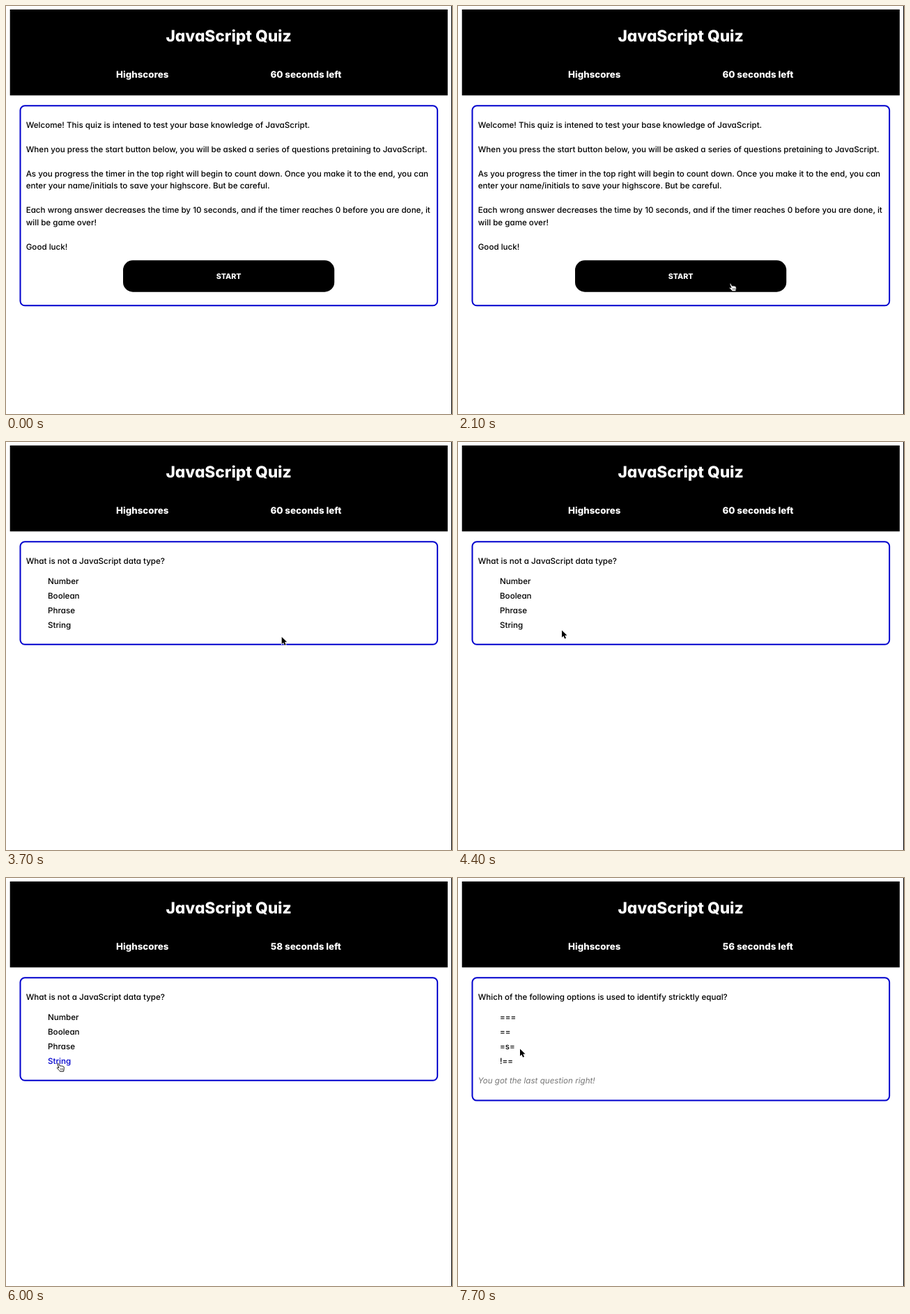
These frames come from a looping animation (640 by 586 pixels, 8000 ms). An HTML page:

```html
<!DOCTYPE html>
<html lang="en">
<head>
<meta charset="utf-8">
<title>JavaScript Quiz</title>
<style>
  html, body { margin: 0; width: 100%; height: 100%; overflow: hidden; background: #fff; }
  svg { display: block; width: 100%; height: 100%; }
  text {
    font: 450 11.62px Inter, "Open Sans", sans-serif;
    font-feature-settings: "cv11", "calt" 0;
    text-rendering: geometricPrecision;
    white-space: pre;
  }
  .bold { font-weight: 800; fill: #fff; text-anchor: middle; }
  .title { font-size: 22.7px; }
  .bar { font-size: 13.3px; }
  .start { font-size: 10.7px; }
  .result { font-style: italic; fill: #777; }
  .hover { fill: #0000cd; }
  .box { fill: none; stroke: #0000cd; stroke-width: 2; }
</style>
</head>
<body>
<svg viewBox="0 0 640 586">
  <rect x="639" width="1" height="586"/>
  <rect x="5.7" y="5" width="628.1" height="123.4"/>
  <text class="bold title" x="319.6" y="51">JavaScript Quiz</text>
  <text class="bold bar" x="195.7" y="103.2">Highscores</text>
  <text class="bold bar" id="timer" x="430.4" y="103.2">60 seconds left</text>
  <rect class="box" id="box" x="20.5" y="143.3" width="598.6" height="287" rx="6.5"/>

  <g id="welcome">
    <text x="28.7" y="175">Welcome! This quiz is intened to test your base knowledge of JavaScript.</text>
    <text x="28.7" y="210">When you press the start button below, you will be asked a series of questions pretaining to JavaScript.</text>
    <text x="28.7" y="245">As you progress the timer in the top right will begin to count down. Once you make it to the end, you can</text>
    <text x="28.7" y="262.4">enter your name/initials to save your highscore. But be careful.</text>
    <text x="28.7" y="297.3">Each wrong answer decreases the time by 10 seconds, and if the timer reaches 0 before you are done, it</text>
    <text x="28.7" y="314.7">will be game over!</text>
    <text x="28.7" y="349.5">Good luck!</text>
    <rect x="168" y="365.3" width="303.2" height="45.4" rx="14"/>
    <text class="bold start" x="319.7" y="391.9">START</text>
  </g>

  <g id="types">
    <text x="28.7" y="175">What is not a JavaScript data type?</text>
    <text x="60" y="204">Number</text>
    <text x="60" y="225">Boolean</text>
    <text x="60" y="246" id="phrase">Phrase</text>
    <text x="60" y="267" id="string">String</text>
  </g>

  <g id="equality">
    <text x="28.7" y="175">Which of the following options is used to identify stricktly equal?</text>
    <text x="60" y="204">===</text>
    <text x="60" y="225">==</text>
    <text x="60" y="246" id="mixed">=s=</text>
    <text x="60" y="267">!==</text>
    <text x="28.7" y="295" class="result">You got the last question right!</text>
  </g>

  <g id="cursor">
    <path id="arrow" stroke="#fff" stroke-width="1.4" paint-order="stroke"
      d="M0 0V10.2L2.4 8 4.1 12 6 11.2 4.3 7.3H7.5Z"/>
    <g id="hand" fill="#fff" stroke="#000" stroke-width=".95" stroke-linejoin="round">
      <path d="M1.1 1.9C.6.7 2.2.1 2.9 1.2L4.5 4.2C5 3.5 6 3.6 6.4 4.2 7 3.6 8 3.8 8.3 4.6 9.3 4.2 10 5 10.2 6.1 10.6 8 9.9 9.2 9.7 11.8H4.5C3.8 10.2 1.9 8.8.7 7.6-.2 6.6.9 5.6 1.9 6.2L3 7Z"/>
      <path d="M5.3 7.3V9.7M6.9 7.3V9.7M8.4 7.3V9.7" stroke-width=".6"/>
    </g>
  </g>
</svg>
<script>
  const LOOP = 8000, STEP = 100;
  const $ = id => document.getElementById(id);
  const show = (id, on) => $(id).setAttribute("display", on ? "inline" : "none");
  const hover = (id, on) => $(id).setAttribute("class", on ? "hover" : "");

  // Cursor stops: time, x, y
  const path = [
    [1300, 444, 505], [1600, 401, 410], [2100, 389, 398], [3300, 389, 398],
    [3500, 381, 392], [3600, 381, 392], [3900, 425, 56], [4100, 400, 62],
    [4400, 149, 270.5], [4500, 139, 268], [5200, 98, 265.8], [5400, 75, 266],
    [5600, 74, 266], [5800, 73, 266], [6400, 73, 266], [6700, 77.5, 247],
    [7400, 77.5, 247], [7700, 89, 245.5]
  ];

  function cursorAt(t) {
    const next = path.findIndex(p => p[0] > t);
    if (next < 0) return path[path.length - 1].slice(1);
    const [t0, x0, y0] = path[Math.max(0, next - 1)];
    const [t1, x1, y1] = path[next];
    const k = Math.max(0, (t - t0) / (t1 - t0));
    return [x0 + (x1 - x0) * k, y0 + (y1 - y0) * k];
  }

  function draw(now) {
    const t = Math.floor((now % LOOP) / STEP) * STEP;
    const within = (from, to) => t >= from && t < to;
    const seconds = t < 4500 ? 60 : 59 - Math.floor((t - 4500) / 1000);

    $("timer").textContent = seconds + " seconds left";
    show("welcome", t < 2500);
    show("types", within(2500, 7100));
    show("equality", t >= 7100);
    $("box").setAttribute("height", t < 2500 ? 287 : t < 7100 ? 147.5 : 176.3);

    hover("string", within(5400, 6600));
    hover("phrase", within(6600, 7100));
    hover("mixed", within(7100, 7600));

    const isHand = within(1600, 3100) || within(5400, 7600);
    show("cursor", t >= 1300);
    show("hand", isHand);
    show("arrow", !isHand);
    $("cursor").setAttribute("transform", `translate(${cursorAt(t)})`);
  }

  const start = performance.now();
  function tick() {
    draw(performance.now() - start);
    requestAnimationFrame(tick);
  }
  tick();
</script>
</body>
</html>
```
